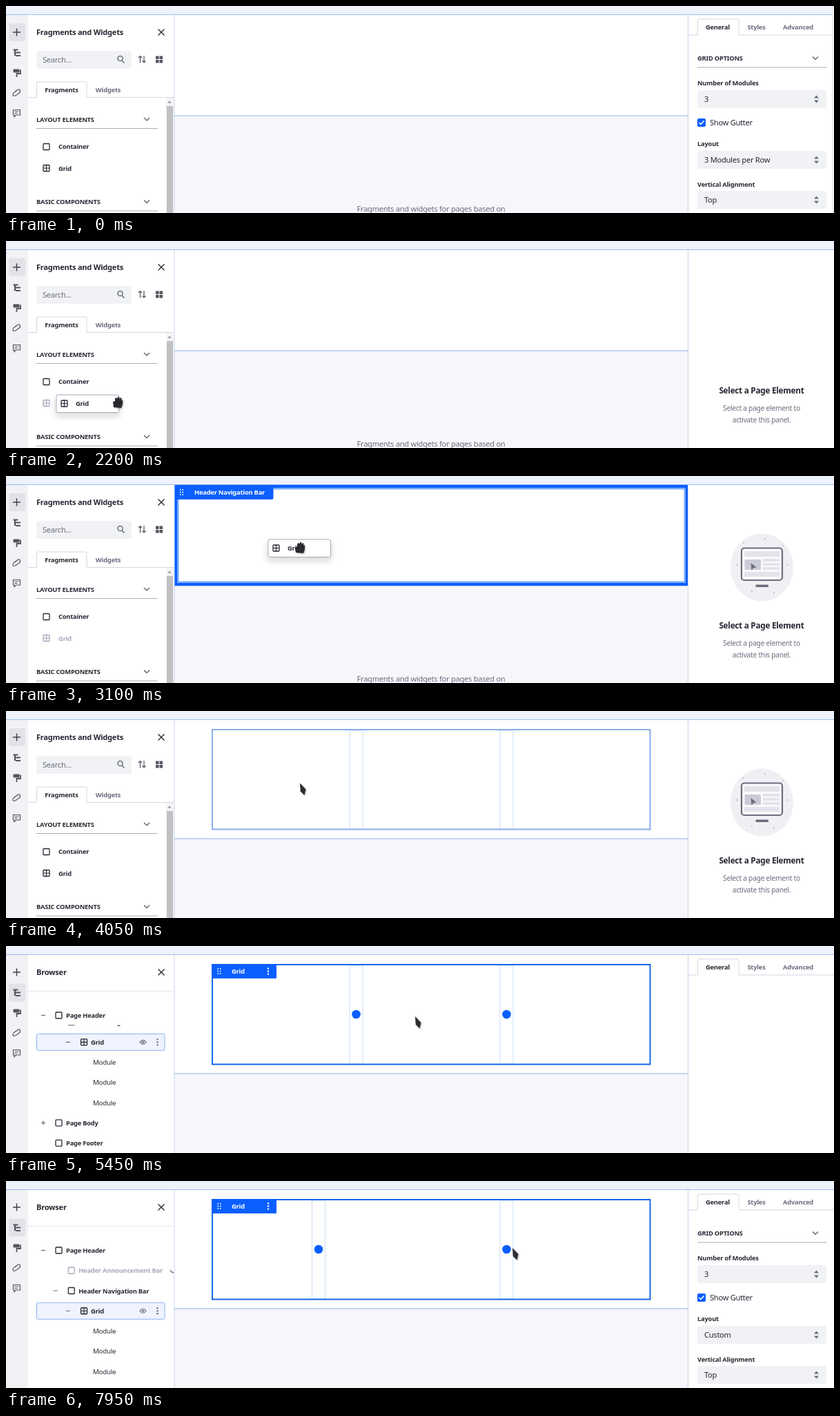
These frames come from a looping animation (1200x300 px, 8 s). An HTML page:

```html
<!DOCTYPE html>
<html lang="en">
<head>
<meta charset="utf-8">
<title>Page editor grid</title>
<style>
html, body { margin: 0; width: 100%; height: 100%; overflow: hidden; background: #fff; }
svg { display: block; }
text { font: 600 9.35px 'Noto Sans', sans-serif; letter-spacing: -.024em; fill: #272833; white-space: pre; }
.body { font-weight: 400; font-size: 11.1px; }
.title { font-weight: 700; font-size: 11.1px; }
.head { font-size: 11.8px; }
.thin { font-weight: 400; font-size: 9.7px; }
.note { font-weight: 400; font-size: 10.2px; }
.mute { fill: #6b6c7e; }
.off { fill: #a7a9bc; }
.inv { fill: #fff; }
</style>
</head>
<body>
<svg id="stage" width="1200" height="300" viewBox="0 0 1200 300"></svg>
<script>
const BLUE = '#0b5fff', INK = '#272833', GREY = '#6b6c7e', PALE = '#f1f2f5';
const LOOP = 8000, STEP = 50;

const text = (x, y, s, cls = '', extra = '') => `<text x="${x}" y="${y}" class="${cls}" ${extra}>${s}</text>`;
const middle = 'text-anchor="middle"';
const rect = (x, y, w, h, fill, extra = '') => `<rect x="${x}" y="${y}" width="${w}" height="${h}" fill="${fill}" ${extra}/>`;
const path = (d, color = INK, w = 1.2, extra = '') => `<path d="${d}" fill="none" stroke="${color}" stroke-width="${w}" ${extra}/>`;
const shape = (d, fill, extra = '') => `<path d="${d}" fill="${fill}" ${extra}/>`;
const group = (id, body, extra = '') => `<g id="${id}" ${extra}>${body}</g>`;
const dot = (x, y, r, fill) => `<circle cx="${x}" cy="${y}" r="${r}" fill="${fill}"/>`;

const box = (x, y, c = INK) => rect(x - 4.5, y - 4.5, 9, 9, 'none', `rx="1" stroke="${c}" stroke-width="1.3"`);
const gridIcon = (x, y, c = INK) => box(x, y, c) + path(`M${x - 4.5} ${y}h9M${x} ${y - 4.5}v9`, c);
const chevron = (x, y) => path(`M${x - 4} ${y - 2}l4 4 4-4`, '#54555f');
const close = path('M220.5 33.5l9 9m0-9l-9 9', INK, 1.4);
const kebab = (x, y, c) => [-4, 0, 4].map(d => dot(x, y + d, 1.2, c)).join('');
const grip = (x, y) => [-1.7, 1.7].map(dx => [-3.5, 0, 3.5].map(dy => dot(x + dx, y + dy, .9, '#fff')).join('')).join('');

function section(x, right, y, name) {
  return text(x, y + 3.5, name) + chevron(right - 16, y) + path(`M${x} ${y + 13.5}H${right}`, '#a9abb8', 1);
}
function select(y, value, id = '') {
  return rect(1002, y, 187, 26, PALE, 'rx="3"') + text(1012, y + 17, value, 'body', id && `id="${id}"`) +
    shape(`M1171 ${y + 11.5}h7l-3.5-4zM1171 ${y + 14.5}h7l-3.5 4z`, GREY);
}

const rail = rect(0, 13, 32, 287, PALE) +
  `<rect id="railActive" x="4" width="24" height="26" rx="3" fill="#e2e2e8"/>` +
  path('M10 38h11M15.5 32.5v11', '#40414c', 1.5) +
  path('M10.5 63.5h7M13 67.5h8M14 72h7M13 64v8', '#54555f', 2.2) +
  rect(10.5, 91.5, 9, 5, '#54555f', 'rx="1"') + path('M20 93.5h1v4.5h-5.500v5', '#54555f', 1.8) +
  path('M12 125l5-3.500q3-1.500 3.500 1t-2 4l-5 3.500q-3 1-3.500-1t1.500-3.500l4.500-3', '#54555f', 1.2) +
  path('M10.500 150.500h10v7.500h-6l-2.500 2.500v-2.500h-1.500zM12.500 153h6M12.500 155.500h4', '#54555f', 1.2);

const fragments =
  text(44, 42, 'Fragments and Widgets', 'title') + close +
  rect(44, 65, 138, 26, PALE, 'rx="3"') + text(53, 81.500, 'Search...', 'body mute') +
  `<circle cx="165.500" cy="76" r="3.600" fill="none" stroke="${GREY}" stroke-width="1.500"/>` + path('M168 79l3.500 3.500', GREY, 1.6) +
  path('M194.500 82.500v-10m-2.500 2.500l2.500-2.500 2.500 2.500M200 72v10m-2.500-2.500l2.500 2.500 2.500-2.500', '#54555f', 1.2) +
  [217, 222.500].map(x => [72.500, 78].map(y => rect(x, y, 4.500, 4.500, '#54555f')).join('')).join('') +
  path('M32 132.500H44.500V112q0-2 2-2H115q2 0 2 2v20.500H243', '#d5d7e0', 1) +
  text(80.500, 124.500, 'Fragments', '', middle) + text(148, 124.500, 'Widgets', 'mute', middle) +
  section(44, 220, 164, 'LAYOUT ELEMENTS') +
  box(58.500, 204) + text(76, 207, 'Container') +
  group('item', gridIcon(58.500, 235) + text(76, 238.500, 'Grid')) +
  group('itemDragged', gridIcon(58.500, 235, '#a7a9bc') + text(76, 238.500, 'Grid', 'off')) +
  section(44, 220, 283.500, 'BASIC COMPONENTS') +
  rect(232, 133, 11, 167, '#f4f4f5') + rect(233, 145, 9, 155, '#c1c1c3') + shape('M234.500 140.500h5l-2.500-3z', '#8b8b8f');

const row = i => 100.500 + i * 29.250;
const toggle = (x, y, plus) => path(`M${x - 3} ${y}h6` + (plus ? `M${x} ${y - 3}v6` : ''), GREY, 1.2);
const node = (i, depth, name, cls = '') => box(76.500 + depth * 18.300, row(i), cls ? '#a7a9bc' : INK) + text(87 + depth * 18.200, row(i) + 3.500, name, cls);
const gy = row(3);
const browser =
  text(44, 42, 'Browser', 'title') + close + path('M32 65.500H243', '#e7e7ed', 1) +
  toggle(54, row(0)) + node(0, 0, 'Page Header') +
  `<clipPath id="treeClip"><rect x="32" y="114.500" width="211" height="186"/></clipPath>` +
  `<g clip-path="url(#treeClip)">` + group('tree',
    node(1, 1, 'Header Announcement Bar', 'off') + path('M238 129q2 4 5.500 4', GREY, 1.3) +
    toggle(72, row(2)) + node(2, 1, 'Header Navigation Bar') +
    rect(44.500, gy - 12, 185.500, 24, '#eef3fd', 'rx="2" stroke="#8db2f2"') +
    toggle(90, gy) + gridIcon(113, gy) + text(123, gy + 3.500, 'Grid') +
    path(`M194 ${gy}q4.500-6 9 0q-4.500 6-9 0z`, GREY) + dot(198.500, gy, 1.6, GREY) + kebab(219.500, gy, GREY) +
    [4, 5, 6].map(i => text(126, row(i) + 3.500, 'Module', 'thin')).join('') +
    toggle(54, row(7), true) + node(7, 0, 'Page Body') + node(8, 0, 'Page Footer')) + '</g>';

const settings =
  path('M989 42H1002.500V21q0-2 2-2H1060q2 0 2 2v21H1200', '#d5d7e0', 1) +
  text(1031.500, 34, 'General', '', middle) + text(1087.500, 34, 'Styles', 'mute', middle) + text(1148, 34, 'Advanced', 'mute', middle) +
  group('options',
    section(1002, 1189, 75.500, 'GRID OPTIONS') +
    text(1002, 115, 'Number of Modules') + select(122, '3') +
    rect(1002, 163, 12, 12, BLUE, 'rx="2"') + path('M1004.500 169l2.500 2.500 4.500-5', '#fff', 1.5) + text(1020, 173, 'Show Gutter', 'body') +
    text(1002, 203, 'Layout') + select(210, '3 Modules per Row', 'layout') +
    text(1002, 262, 'Vertical Alignment') + select(268, 'Top'));

const bar = (x, y, w, h) => rect(x, y, w, h, '#e3e3ec', 'rx="1.500"');
const picture = `<ellipse cx="1095.500" cy="132.500" rx="45.500" ry="49" fill="#f0f0f4"/>` +
  rect(1066, 104.500, 59, 46.500, '#fafafc', `rx="4" stroke="${GREY}" stroke-width="2.200"`) +
  bar(1070, 109, 51, 8) + rect(1070.500, 121, 23.500, 15, '#cbcbd8', 'rx="1.500"') +
  bar(1096.500, 120, 25, 4) + bar(1096.500, 126, 25, 4) + bar(1096.500, 132, 25, 4) + bar(1070, 139, 51, 7) +
  shape('M1079.500 126l8 6.500-4.500.7-2.500 3.800z', GREY) + rect(1086.500, 157.500, 18.500, 3.500, GREY, 'rx="1"') +
  [[1100, 91], [1069, 97], [1059, 129], [1132, 129], [1081, 167], [1113, 169], [1126, 101]].map(([x, y]) => dot(x, y, 1, '#b5b5c4')).join('');
const empty = group('picture', picture) +
  text(1095, 221, 'Select a Page Element', 'head', middle) +
  text(1095, 246, 'Select a page element to', 'note mute', middle) +
  text(1095, 263, 'activate this panel.', 'note mute', middle);

// The grid has 12 columns with a 19 px gutter.
const PITCH = 54.45, GUTTER = 19;
const columns = Array.from({ length: 12 }, (_, i) => rect(299 + i * PITCH, 28, PITCH - GUTTER, 143, '#fff8f5')).join('');
const gutter = rect(-9.500, 28, 19, 143, '#fff', 'stroke="#c9dcf3"');
const handle = dot(0, 99, 6.300, BLUE);
const gridBlock = group('columns', columns) +
  group('split', gutter + group('dash', path('M0 28V171', '#77777f', 1, 'stroke-dasharray="3 2"')) + group('handleA', handle)) +
  `<g transform="translate(725.500)">${gutter}${group('handleB', handle)}</g>` +
  `<rect id="frame" x="299" y="27" width="634.500" height="144.500" fill="none" stroke-width="2"/>` +
  group('gridTag', rect(298, 26, 94, 21, BLUE, 'rx="1"') + grip(309, 36.500) + text(327, 40, 'Grid', 'inv') + kebab(380, 36.500, '#fff'));

const target = rect(249, 18, 735, 136, 'none', 'stroke="#78aaff" stroke-width="3"') +
  rect(246, 15, 741, 142, 'none', `stroke="${BLUE}" stroke-width="4"`) +
  rect(244, 13, 143.500, 21, BLUE, 'rx="2"') + grip(254.500, 23.500) + text(273, 27, 'Header Navigation Bar', 'inv');

document.getElementById('stage').innerHTML =
  `<defs><filter id="soft" x="-30%" y="-60%" width="160%" height="260%"><feDropShadow dx="0" dy="5" stdDeviation="5" flood-color="#272833" flood-opacity=".18"/></filter>
  <filter id="glow" x="-60%" y="-60%" width="220%" height="220%"><feDropShadow dx="1" dy="1" stdDeviation="1.200" flood-opacity=".3"/></filter></defs>` +
  rect(244, 13, 745, 190, '#fff') +
  group('below', rect(244, 159, 745, 200, '#f7f6fb') + path('M244 159H989', '#b0c9ee', 1.6) +
    text(616, 298, 'Fragments and widgets for pages based on', 'body mute', middle)) +
  group('grid', gridBlock) + group('target', target) +
  rail + rect(32, 13, 212, 287, '#fff') + group('fragments', fragments) + group('browser', browser) +
  path('M244 13V300M988.500 13V300', '#c6d5ec', 1) +
  rect(989, 13, 211, 287, '#fff') + group('settings', settings) + group('empty', empty) +
  rect(0, 0, 1200, 12.500, '#eef2fb') + path('M0 12.500H1200', '#9dbbed', 1) +
  group('edge', rect(1197, 0, 3, 300, '#efeff3')) +
  group('ghost', rect(-46, -12, 90.500, 25.500, '#fff', 'rx="2" stroke="#a7a9bc" filter="url(#soft)"') + gridIcon(-34.500, .5) + text(-18, 4, 'Grid')) +
  group('hand', shape('M-6 7L-7-1-4-2-4-6-2-7-1-5 0-8 2-8 2.500-5 4-7 5.500-6 5-3 7-4 7 2 5 8z', '#2b2b2e'), 'filter="url(#glow)"') +
  group('arrow', shape('M0 0L8.500 9 6.500 17.500 .8 12z', '#2f2f33'), 'filter="url(#glow)"');

const $ = Object.fromEntries([...document.querySelectorAll('[id]')].map(e => [e.id, e]));
const show = (name, on) => $[name].style.display = on ? '' : 'none';
const move = (name, x, y = 0) => $[name].setAttribute('transform', `translate(${x} ${y})`);
const clamp = v => Math.min(1, Math.max(0, v));

// Pointer: time, x, y, and whether the leg is eased.
const track = [
  [0, 640, 330], [200, 640, 312], [1000, 300, 262, 1], [1750, 88, 235, 1], [2100, 88, 235],
  [2150, 119, 235], [2200, 162, 234], [2400, 280, 205], [2650, 375, 150], [2950, 426, 104],
  [3950, 426, 104], [4350, 426, 106], [4600, 426, 106], [4950, 593, 102, 1], [5500, 593, 102],
  [6050, 508, 99, 1], [6300, 508, 99], [7000, 456, 97], [7250, 456, 97], [7950, 734, 97, 1], [8000, 734, 97]
];
function pointer(t) {
  const i = Math.max(1, track.findIndex(k => k[0] >= t));
  const [t0, x0, y0] = track[i - 1], [t1, x1, y1, eased] = track[i];
  let p = clamp((t - t0) / (t1 - t0));
  if (eased) p = p * p * (3 - 2 * p);
  return [x0 + (x1 - x0) * p, y0 + (y1 - y0) * p];
}

function draw(t) {
  const dragging = t >= 2150 && t < 3950, dropped = t >= 4050;
  const selected = t >= 5300, browsing = t >= 5350, resizing = t >= 6300 && t < 7250;
  const grabbing = t >= 1700 && t < 3950;

  show('edge', t < 1950);
  show('fragments', !browsing);
  show('browser', browsing);
  $.railActive.setAttribute('y', browsing ? 54.5 : 25);
  move('tree', 0, -175 * (1 - clamp((t - 5350) / 200)) ** 1.84);

  const empty = t >= 2150 && !browsing;
  show('empty', empty);
  show('picture', t >= 2300);
  show('settings', !empty);
  show('options', t < 2150 || t >= 5600);
  $.layout.textContent = t < 7400 ? '3 Modules per Row' : 'Custom';

  show('item', !dragging);
  show('itemDragged', dragging);
  show('ghost', dragging);
  move('ghost', ...pointer(t - STEP));

  show('target', t >= 2950 && t < 4000);
  $.target.setAttribute('opacity', clamp((t - 2950) / 100));
  move('below', 0, dropped ? 26 : 0);
  show('grid', dropped);
  $.frame.setAttribute('stroke', selected ? '#1467e8' : '#86aeea');
  for (const name of ['gridTag', 'handleA', 'handleB']) show(name, selected);
  show('columns', resizing);
  show('dash', resizing);
  move('split', t < 6700 ? 507.5 : 507.5 - PITCH);

  show('hand', grabbing);
  show('arrow', !grabbing);
  move('hand', ...pointer(t));
  move('arrow', ...pointer(t));
}

const start = performance.now();
function tick() {
  const t = (performance.now() - start) % LOOP;
  draw(Math.floor(t / STEP) * STEP);
  requestAnimationFrame(tick);
}
tick();
</script>
</body>
</html>
```
